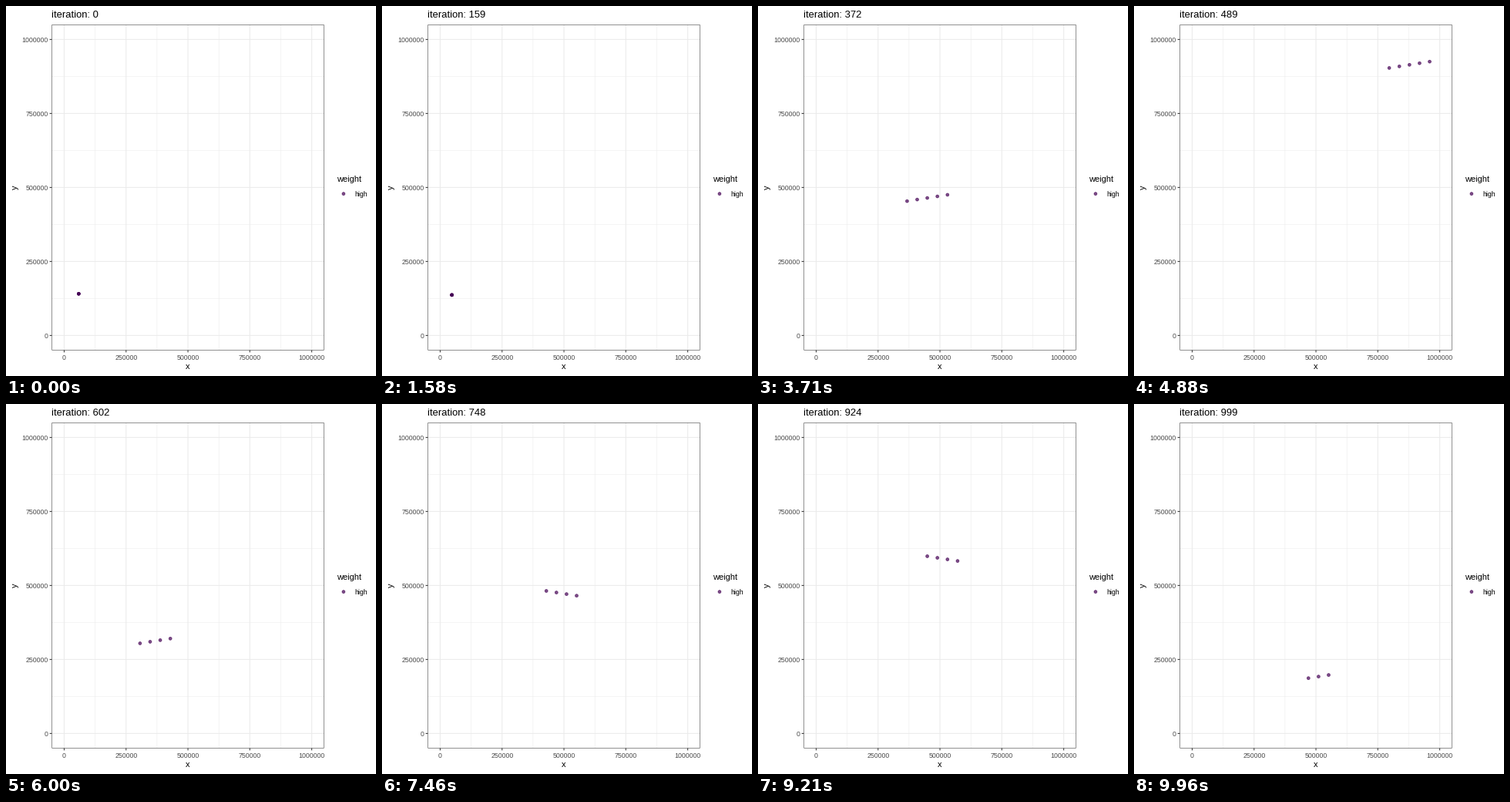
These frames come from a looping animation (480x480 px, 10 s). A matplotlib script:

```python
import numpy as np
import matplotlib.pyplot as plt
from matplotlib.animation import FuncAnimation
from matplotlib.patches import Circle, Rectangle

SIZE, DPI = 480, 72
LOOP_MS, TICK_MS = 10000, 20
STEPS = 240         # distinct pictures in one loop
LAST = 999          # last iteration
KICK = 311          # iteration at which the particle turns fast
LEFT, RIGHT, TOP, BOTTOM = 59.4, 412.7, 24.2, 446.6
MAJOR = range(0, 1000001, 250000)
MINOR = range(125000, 1000000, 250000)
GRID, DARK, LABEL, POINT = "#EBEBEB", "#333333", "#4D4D4D", "#440154"
LINE = 1.07

plt.rcParams["font.family"] = "Liberation Sans"


def px(x):
    pad = (RIGHT - LEFT) / 22
    return LEFT + pad + x / 1e6 * (RIGHT - LEFT - 2 * pad)


def py(y):
    pad = (BOTTOM - TOP) / 22
    return BOTTOM - pad - y / 1e6 * (BOTTOM - TOP - 2 * pad)


def walk():
    """Slow drift, then fast flight that stops at each wall and turns back."""
    pos = np.array([58800.0, 140900.0])
    vel = np.array([-73.0, -26.1])
    path = [pos]
    for n in range(1, LAST + 1):
        if n == KICK:
            vel = np.array([-40800.0, 5350.0])
        pos = pos + vel
        vel = np.where((pos < 0) | (pos > 1e6), -vel, vel)
        pos = np.clip(pos, 0, 1e6)
        path.append(pos)
    return np.array(path)


fig = plt.figure(figsize=(SIZE / DPI, SIZE / DPI), dpi=DPI, facecolor="white")
ax = fig.add_axes([0, 0, 1, 1])
ax.set(xlim=(0, SIZE), ylim=(SIZE, 0))
ax.axis("off")


def line(x0, y0, x1, y1, color, width=LINE):
    ax.plot([x0, x1], [y0, y1], color=color, lw=width, snap=False,
            solid_capstyle="butt")


def text(x, y, s, size, color="black", ha="left", **kw):
    return ax.text(x, y, s, size=size, color=color, ha=ha,
                   va=kw.pop("va", "baseline"), **kw)


def dot(x, y):
    return ax.add_patch(Circle((x, y), 1.95, facecolor=POINT, edgecolor=POINT,
                               alpha=0.7, lw=0.71, zorder=4))


for values, width in ((MINOR, LINE / 2), (MAJOR, LINE)):
    for v in values:
        line(LEFT, py(v), RIGHT, py(v), GRID, width)
        line(px(v), TOP, px(v), BOTTOM, GRID, width)

for v in MAJOR:
    line(LEFT - 2.75, py(v), LEFT, py(v), DARK)
    line(px(v), BOTTOM, px(v), BOTTOM + 2.75, DARK)
    text(LEFT - 4.95, py(v) + 3.2, str(v), 8.8, LABEL, "right")
    text(px(v), 459, str(v), 8.8, LABEL, "center")

# Only the inner half of the border stroke is visible.
inset = LINE / 4
ax.add_patch(Rectangle((LEFT + inset, TOP + inset),
                       RIGHT - LEFT - 2 * inset, BOTTOM - TOP - 2 * inset,
                       fill=False, ec=DARK, lw=LINE / 2, snap=False, zorder=5))

text(px(5e5), 471, "x", 11, ha="center")
text(12, py(5e5), "y", 11, ha="center", va="center", rotation=90)
text(429.2, 228, "weight", 11)
dot(437.9, 243.6)
text(452, 247, "high", 8.8)
title = text(LEFT, 15, "", 13)

path = walk()
shown_in = np.rint(np.arange(LAST + 1) * (STEPS - 1) / LAST).astype(int)
dots = [dot(0, 0) for _ in range(5)]


def draw(i):
    # Steps start on whole hundredths of a second; look ahead to the nearest.
    step = int((i * TICK_MS + 15) * STEPS / LOOP_MS)
    title.set_text(f"iteration: {round(step * LAST / (STEPS - 1))}")
    points = path[shown_in == step]
    for k, d in enumerate(dots):
        d.set_visible(k < len(points))
        if k < len(points):
            x, y = points[k]
            d.center = px(x), py(y)
    return [title, *dots]


anim = FuncAnimation(fig, draw, frames=LOOP_MS // TICK_MS, interval=TICK_MS,
                     repeat=True, repeat_delay=0)
plt.show()
```
